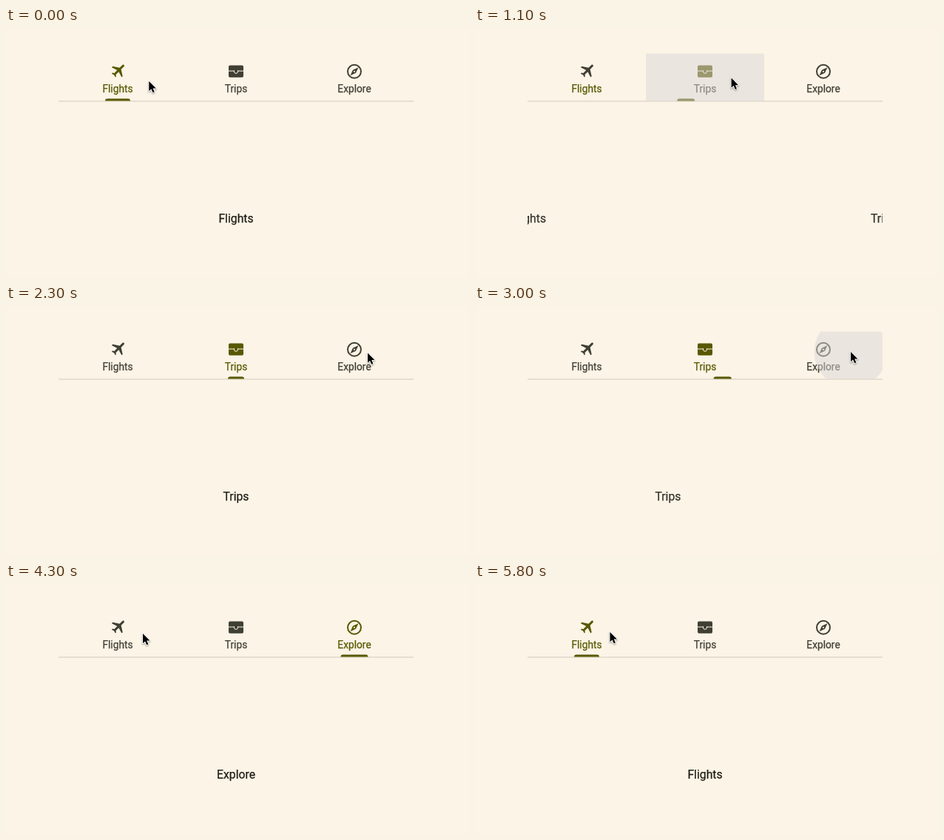
Animation, 626 px wide and 338 px high, one loop 6 s. Source, as an HTML page with a canvas:

```html
<!DOCTYPE html>
<html lang="en">
<head>
<meta charset="utf-8">
<title>Tabs</title>
<style>
  html, body { margin: 0; width: 100%; height: 100%; overflow: hidden; background: #fcf4e6; }
  canvas { display: block; }
</style>
</head>
<body>
<canvas id="stage" width="626" height="338"></canvas>
<script>
const ctx = document.getElementById('stage').getContext('2d');
const LOOP = 6000, STEP = 100;
const BG = '#fcf4e6', OLIVE = '#595800', MUTED = '#403f34', INK = '#1c1c16';
const LEFT = 71, TOP = 34.6, TAB = 160, PAGE = 480, LINE = 98.5;
const SLIDE = 720;

const tabs = [
  { label: 'Flights', bar: 34, icon: drawPlane },
  { label: 'Trips', bar: 22, icon: drawCase },
  { label: 'Explore', bar: 37, icon: drawCompass },
];
const clicks = [
  { at: 849, from: 0, to: 1, x: 346, y: 67, radius: 121, life: 490 },
  { at: 2880, from: 1, to: 2, x: 508, y: 62, radius: 122, life: 490 },
  { at: 4793, from: 2, to: 0, x: 182, y: 65, radius: 27, life: 290 },
];
// Pointer stops: time, x, y
const pointer = [
  [0, 193.3, 72], [700, 346.6, 67.6], [1500, 346.6, 67.6], [2100, 475, 63.5], [2300, 489, 63.5],
  [2700, 508, 62], [3500, 508, 62], [3600, 490, 65.5], [3700, 453, 70],
  [4200, 193, 68], [4300, 185, 67], [4500, 182.5, 65], [6000, 182.5, 65],
];

const planePath = new Path2D('M21 16v-2l-8-5V3.5c0-.83-.67-1.5-1.5-1.5S10 2.67 10 3.5V9l-8 5v2l8-2.5V19l-2 1.5V22l3.5-1 3.5 1v-1.5L13 19v-5.5z');
const needlePath = new Path2D('M6.5 17.5l7.51-3.49L17.5 6.5 9.99 9.99zM12 10.9a1.1 1.1 0 1 1 0 2.2 1.1 1.1 0 0 1 0-2.2z');
const seamPath = new Path2D('M-10 -.7H-2.5M2.5 -.7H10M-2.5 -1.5V.2Q-2.5 2.5 0 2.5T2.5 .2V-1.5');
const arrowPath = new Path2D('M0 0V13.2L3.1 10.4 5.2 15.3 7.4 14.4 5.3 9.6H9.5Z');

const clamp = v => Math.min(1, Math.max(0, v));
const mix = (a, b, k) => a + (b - a) * k;
const center = i => LEFT + TAB * (i + 0.5);

// Cubic bezier easing with control points (x1, 0) and (x2, 1)
function ease(x1, x2, x) {
  x = clamp(x);
  let lo = 0, hi = 1;
  for (let i = 0; i < 24; i++) {
    const u = (lo + hi) / 2, v = 1 - u;
    if (3 * x1 * v * v * u + 3 * x2 * v * u * u + u ** 3 < x) lo = u; else hi = u;
  }
  return lo * lo * (3 - 2 * lo);
}

function at(x, y, draw) {
  ctx.save();
  ctx.translate(x, y);
  draw();
  ctx.restore();
}

function clipped(x, y, w, h, draw) {
  ctx.save();
  ctx.beginPath();
  ctx.rect(x, y, w, h);
  ctx.clip();
  draw();
  ctx.restore();
}

function box(x, y, w, h, r) {
  ctx.beginPath();
  ctx.roundRect(x, y, w, h, r);
  ctx.fill();
}

// Text with a hairline outline, for slightly heavier strokes
function write(text, x, y, size, color) {
  ctx.font = `${size}px Roboto, sans-serif`;
  ctx.fillStyle = ctx.strokeStyle = color;
  ctx.lineWidth = 0.25;
  ctx.fillText(text, x, y);
  ctx.strokeText(text, x, y);
}

function drawPlane() {
  ctx.translate(1.8, -1.4);
  ctx.rotate(Math.PI / 4);
  ctx.translate(-12, -12);
  ctx.fill(planePath);
}

function drawCase() {
  box(-10, -8.3, 20, 16.3, 1.8);
  ctx.strokeStyle = BG;
  ctx.lineWidth = 1;
  ctx.stroke(seamPath);
}

function drawCompass() {
  ctx.lineWidth = 2;
  ctx.beginPath();
  ctx.arc(0, 0, 9, 0, 7);
  ctx.stroke();
  ctx.translate(-12, -12);
  ctx.fill(needlePath, 'evenodd');
}

function drawTab(tab, i, iconOn, labelOn) {
  ctx.fillStyle = ctx.strokeStyle = iconOn === i ? OLIVE : MUTED;
  at(center(i), 58.8, tab.icon);
  write(tab.label, center(i), 87.4, 13.75, labelOn === i ? OLIVE : MUTED);
}

function drawPage(i, shift, moving) {
  write(tabs[i].label, 311 + shift, 263.4, 15.75, moving ? '#33322b' : INK);
}

function drawRipple({ to, x, y, radius, life }, age) {
  const start = 91;
  if (age < start || age > life) return;
  clipped(LEFT + TAB * to, TOP, TAB, LINE - TOP, () => {
    ctx.globalAlpha = 0.5 * clamp((life - age) / 190);
    ctx.fillStyle = '#dbd8da';
    ctx.beginPath();
    ctx.arc(x, y, radius * ease(0, 0.2, (age - start) / 200) * 1.01, 0, 7);
    ctx.fill();
  });
}

function drawPointer(t) {
  const n = pointer.findIndex(p => p[0] > t);
  const [t0, x0, y0] = pointer[n - 1], [t1, x1, y1] = pointer[n];
  let k = (t - t0) / (t1 - t0);
  if (t0 === 0) k = k * k * (3 - 2 * k);
  at(mix(x0, x1, k), mix(y0, y1, k), () => {
    ctx.lineJoin = 'round';
    ctx.strokeStyle = '#fff';
    ctx.lineWidth = 2;
    ctx.shadowColor = 'rgba(0,0,0,.4)';
    ctx.shadowBlur = 2;
    ctx.shadowOffsetY = 1;
    ctx.stroke(arrowPath);
    ctx.shadowColor = 'transparent';
    ctx.fillStyle = '#000';
    ctx.fill(arrowPath);
  });
}

function render(t) {
  const click = clicks.filter(c => c.at <= t).pop() || { ...clicks[2], at: -LOOP };
  const { from, to } = click, age = t - click.at;
  const iconOn = age < 240 ? from : to, labelOn = age < 300 ? from : to;

  ctx.fillStyle = BG;
  ctx.fillRect(0, 0, 626, 338);
  ctx.textAlign = 'center';
  ctx.fillStyle = '#d2ccbf';
  ctx.fillRect(LEFT, LINE, PAGE, 1);
  tabs.forEach((tab, i) => drawTab(tab, i, iconOn, labelOn));

  const k = ease(0.4, 0.2, (age - 42) / 375);
  const width = mix(tabs[from].bar, tabs[to].bar, k);
  ctx.fillStyle = OLIVE;
  box(mix(center(from), center(to), k) - width / 2, 95.5, width, 3, [3, 3, 0, 0]);
  drawRipple(click, age);

  const slide = ease(0.35, 0.25, age / SLIDE), dir = Math.sign(to - from);
  const moving = age < SLIDE;
  clipped(LEFT, 100, PAGE, 238, () => {
    if (moving) drawPage(from, -dir * PAGE * slide, true);
    drawPage(to, dir * PAGE * (1 - slide), moving);
  });
  drawPointer(t);
}

// The picture advances ten times a second
function tick() {
  render(Math.floor(performance.now() % LOOP / STEP) * STEP);
  requestAnimationFrame(tick);
}
tick();
</script>
</body>
</html>
```
